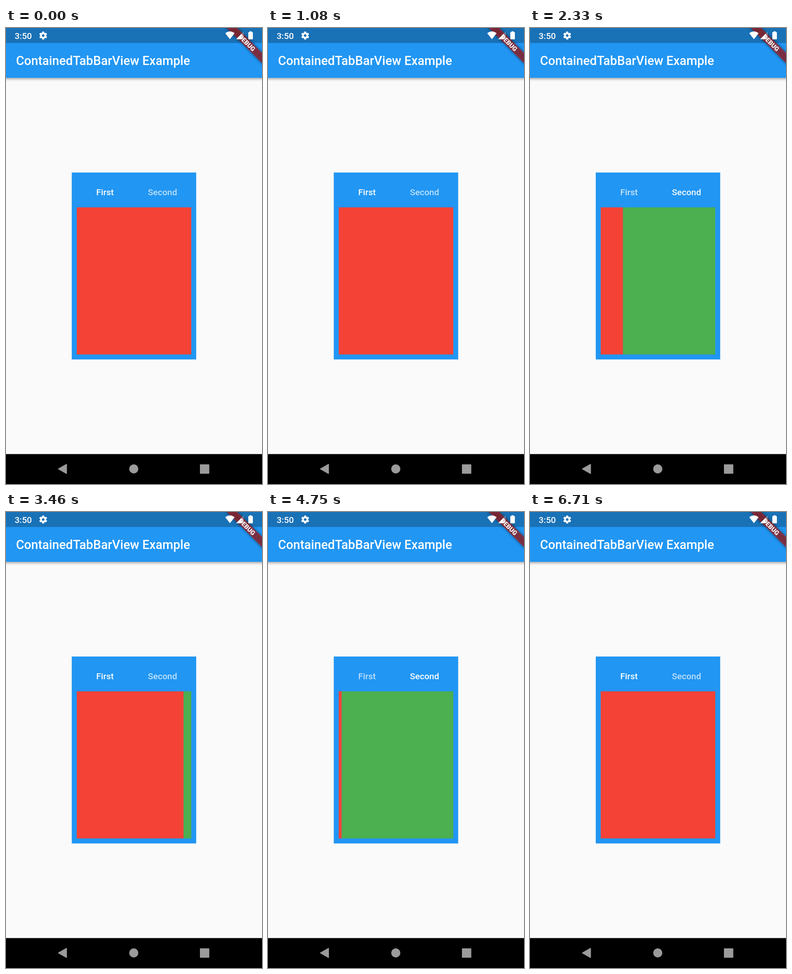
An HTML page that plays this animation: 561 by 998 pixels, repeating every 6750 ms.

```html
<!DOCTYPE html>
<html lang="en">
<head>
<meta charset="utf-8">
<title>Tab bar view</title>
<style>
  html, body { margin: 0; width: 100%; height: 100%; overflow: hidden; background: #fafafa; }
  svg { display: block; width: 561px; height: 998px; }
  text { font: 500 19.09px Roboto, sans-serif; fill: #fff; }
  .mid { text-anchor: middle; }
</style>
</head>
<body>
<svg viewBox="0 0 561 998">
  <defs>
    <filter id="soft" x="-20%" y="-50%" width="140%" height="200%"><feGaussianBlur stdDeviation="3"/></filter>
    <clipPath id="view"><rect x="155" y="392.6" width="251" height="321.8"/></clipPath>
  </defs>
  <rect width="561" height="998" fill="#fafafa"/>

  <!-- App bar -->
  <rect x="-9" y="60" width="579" height="51" fill="#000" opacity=".4" filter="url(#soft)"/>
  <rect width="561" height="109" fill="#2196f3"/>
  <rect width="561" height="32.7" fill="#1971b6"/>
  <text x="22" y="81" style="font-size:27.27px">ContainedTabBarView Example</text>

  <!-- Tabs and pages -->
  <rect x="144.1" y="316.3" width="272.7" height="409.1" fill="#2196f3"/>
  <text class="mid" id="first" x="217" y="365.5">First</text>
  <text class="mid" id="second" x="343" y="365.5">Second</text>
  <g clip-path="url(#view)">
    <g id="pages">
      <rect x="155" y="392" width="251" height="323" fill="#f44336"/>
      <rect x="406" y="392" width="251" height="323" fill="#4caf50"/>
    </g>
  </g>

  <!-- Corner banner -->
  <g transform="translate(561) rotate(45)">
    <rect x="-70" y="38.2" width="140" height="16.4" opacity=".5" filter="url(#soft)"/>
    <rect x="-70" y="38.2" width="140" height="16.4" fill="#b71c1c" fill-opacity=".63"/>
    <text class="mid" y="51.3" style="font-size:13.9px;font-weight:900">DEBUG</text>
  </g>

  <!-- Status bar -->
  <text x="19" y="24">3:50</text>
  <g transform="translate(81.5 16.5)" stroke="#fff" fill="none">
    <circle r="4.8" stroke-width="3.8"/>
    <path id="teeth" stroke-width="4.4"/>
  </g>
  <g fill="#fff">
    <path d="M480.5 11.5Q490.700 3.500 501 11.500L490.700 24.500Z"/>
    <path d="M504.500 24.500H521V7.500Z" opacity=".3"/>
    <path d="M504.500 24.500H516.500V12.200Z"/>
    <path d="M533.500 9V7.300H538.500V9H540Q541 9 541 10V23.500Q541 24.700 540 24.700H532Q531 24.700 531 23.500V10Q531 9 532 9Z"/>
  </g>

  <!-- Navigation bar -->
  <rect y="932.500" width="561" height="66"/>
  <g fill="#9b9b9b" stroke="#9b9b9b" stroke-width="2" stroke-linejoin="round">
    <path d="M115 965L132.500 955V975Z"/>
    <circle cx="280" cy="965" r="9"/>
    <path d="M426 956H444.500V974.500H426Z"/>
  </g>
</svg>
<script>
const LOOP = 6750, SLIDE = 300, PAGE = 251;
const taps = [2180, 3256, 4513, 5620];
const $ = id => document.getElementById(id);

$('teeth').setAttribute('d', [0, 1, 2, 3, 4, 5].map(i => {
  const a = (i + .5) * Math.PI / 3, c = Math.cos(a), s = Math.sin(a);
  return `M${5 * c} ${5 * s}L${8.7 * c} ${8.7 * s}`;
}).join(''));

// cubic-bezier(.25, .1, .25, 1)
function ease(x) {
  if (x <= 0) return 0;
  if (x >= 1) return 1;
  const bez = (u, a, b) => 3 * u * (1 - u) * ((1 - u) * a + u * b) + u ** 3;
  let lo = 0, hi = 1;
  for (let i = 0; i < 20; i++) {
    const u = (lo + hi) / 2;
    if (bez(u, .25, .25) < x) lo = u; else hi = u;
  }
  return bez(lo, .1, 1);
}

function draw(now) {
  const t = now % LOOP;
  // Taps alternate between moving to the second page and back.
  const page = taps.reduce((p, at, i) => p + (i % 2 ? -1 : 1) * ease((t - at) / SLIDE), 0);
  $('pages').setAttribute('transform', `translate(${-PAGE * page})`);
  $('first').setAttribute('fill-opacity', 1 - .3 * page);
  $('second').setAttribute('fill-opacity', .7 + .3 * page);
  requestAnimationFrame(() => draw(performance.now()));
}
draw(0);
</script>
</body>
</html>
```
